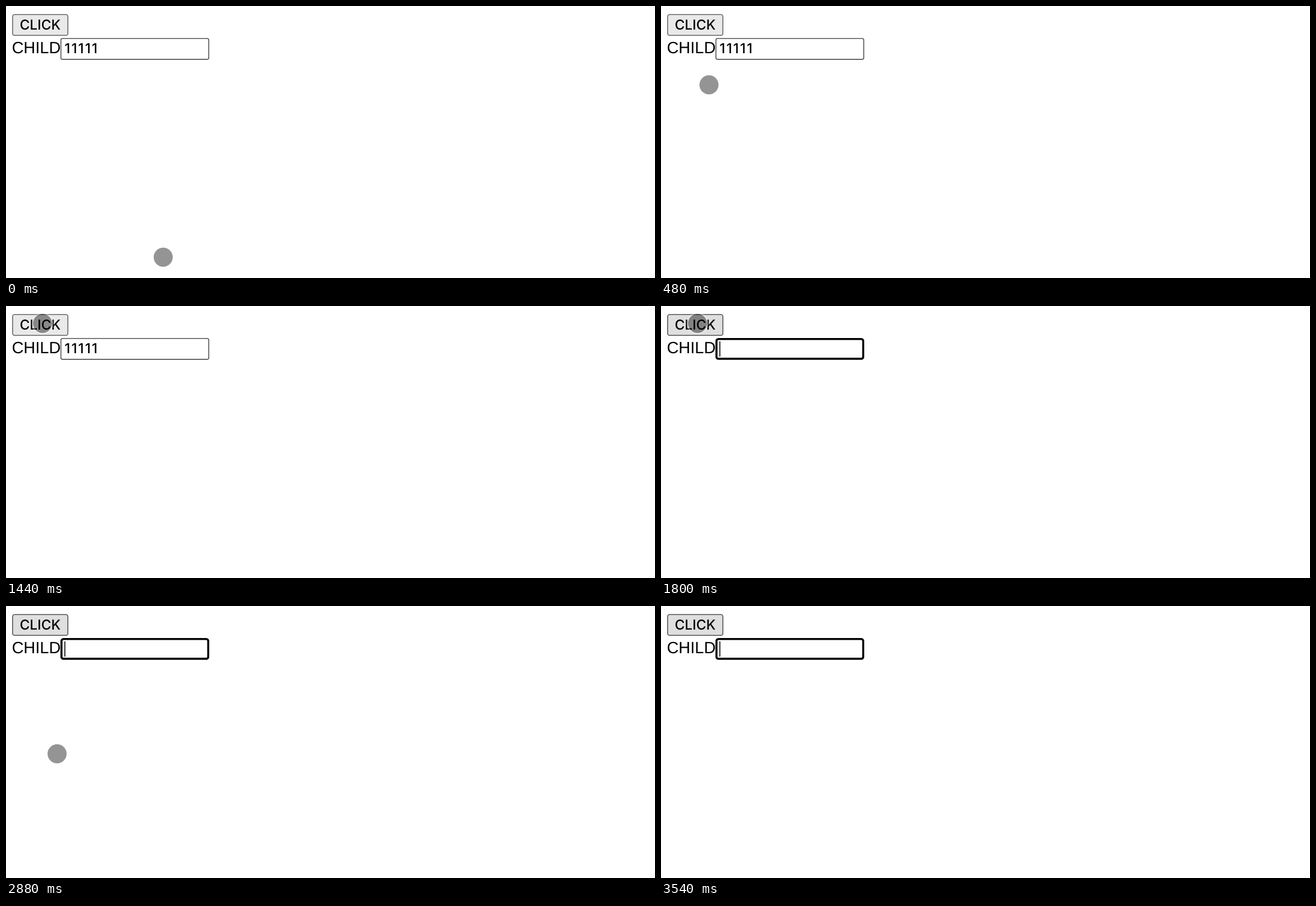
An HTML page that plays this animation: 1156x484 px, repeating every 3.6 s.

```html
<!DOCTYPE html>
<html lang="en">
<head>
<meta charset="utf-8">
<title>Click and focus</title>
<style>
  html, body { margin: 0; width: 100%; height: 100%; overflow: hidden; background: #fff; }
  svg { position: absolute; left: 0; top: 0; }
  text { text-rendering: geometricPrecision; }
  .ui { font: 450 24.4px Inter, Roboto, sans-serif; }
  .label { font: 29px "Liberation Sans", Arial, sans-serif; }
  #value { letter-spacing: 2px; }
  #pointer {
    position: absolute; left: -17px; top: -17px; width: 34px; height: 34px;
    border-radius: 50%; background: rgba(0, 0, 0, .42);
    box-shadow: 0 0 3px 1.5px rgba(255, 255, 255, .6);
  }
</style>
</head>
<body>
<svg width="1156" height="484" viewBox="0 0 1156 484">
  <rect id="button" x="11.75" y="15.25" width="98.5" height="37" rx="3.5" stroke-width="1.6"/>
  <text class="ui" x="24.4" y="42">CLICK</text>
  <text class="label" x="10.4" y="84.3">CHILD</text>
  <rect id="field" fill="#fff"/>
  <text class="ui" id="value" x="104.3" y="84.4">11111</text>
  <rect id="caret" x="104" y="63" width="1.6" height="27"/>
</svg>
<div id="pointer"></div>
<script>
const LOOP = 3600, STEP = 60, CLICK = 1740, BLINK = 420;
const $ = id => document.getElementById(id);

// Key points of the pointer: time, x, y
const keys = [
  [0, 280, 447], [240, 242, 327], [540, 66, 109], [780, 54, 49],
  [960, 62, 25], [1200, 62, 25], [1440, 65, 31], [2100, 65, 31],
  [2280, 65, 33], [2580, 65, 33], [2880, 91, 263], [3060, 107, 454], [3240, 107, 505]
];

const secant = (i, axis) =>
  (keys[i + 1][axis] - keys[i][axis]) / (keys[i + 1][0] - keys[i][0]);

// Speed at a key: harmonic mean of both sides, zero at turns and at the ends
function speed(i, axis) {
  if (i === 0 || i === keys.length - 1) return 0;
  const a = secant(i - 1, axis), b = secant(i, axis);
  return a * b > 0 ? 2 * a * b / (a + b) : 0;
}

// Cubic Hermite curve through the keys
function positionAt(t, axis) {
  const next = keys.findIndex(key => key[0] > t);
  if (next < 0) return keys[keys.length - 1][axis];
  const i = next - 1, span = keys[next][0] - keys[i][0];
  const k = (t - keys[i][0]) / span, rest = 1 - k;
  return keys[i][axis] * rest * rest * (1 + 2 * k) + keys[next][axis] * k * k * (3 - 2 * k)
    + span * k * rest * (speed(i, axis) * rest - speed(next, axis) * k);
}

function setAttrs(id, attrs) {
  for (const name in attrs) $(id).setAttribute(name, attrs[name]);
}

function draw(now) {
  const t = Math.floor(now % LOOP / STEP) * STEP;
  const clicked = t >= CLICK;
  const line = clicked ? 3.6 : 1.6;

  setAttrs("button", clicked ? { fill: "#dfdfdf", stroke: "#4f4f4f" } : { fill: "#e9e9e9", stroke: "#636363" });
  setAttrs("field", {
    x: 97 + line / 2, y: 57 + line / 2, width: 265 - line, height: 38.7 - line,
    rx: clicked ? 3.5 : 3, stroke: clicked ? "#000" : "#505050", "stroke-width": line
  });
  $("value").style.display = clicked ? "none" : "";
  $("caret").style.display = clicked && Math.floor((t - CLICK) / BLINK) % 2 === 0 ? "" : "none";
  $("pointer").style.transform = `translate(${positionAt(t, 1)}px, ${positionAt(t, 2)}px)`;
}

function tick() {
  draw(performance.now());
  requestAnimationFrame(tick);
}
tick();
</script>
</body>
</html>
```
